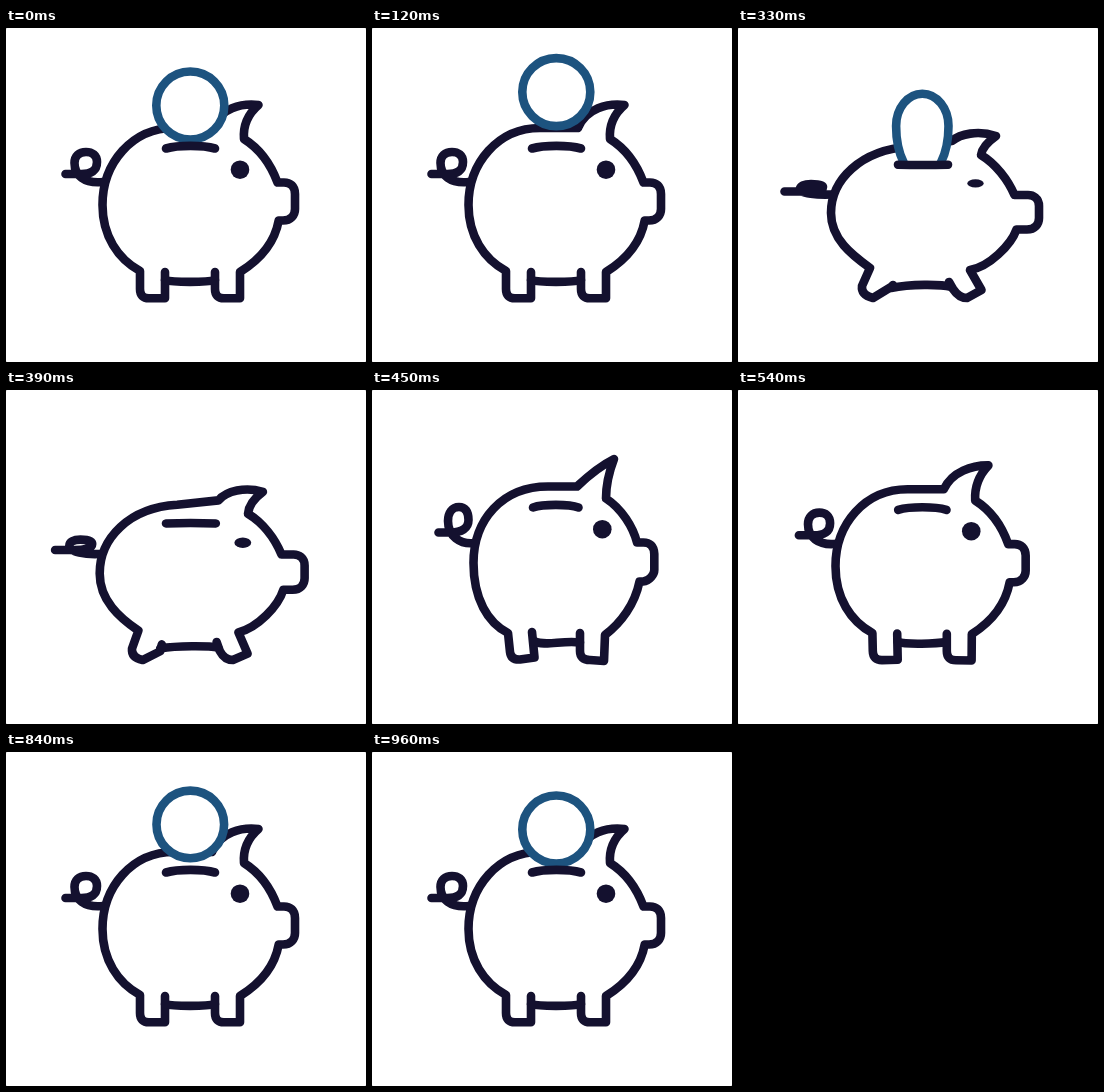
Recreate the animation shown at these times as an HTML page. Size 360x334 px, loop 1.95 s.

```html
<!DOCTYPE html>
<html lang="en">
<head>
<meta charset="utf-8">
<title>Piggy bank</title>
<style>
  html, body { margin: 0; width: 100%; height: 100%; overflow: hidden; background: #aaa; }
  svg { display: block; width: 100vw; height: 100vh; }
  .line { fill: none; stroke: #14112f; stroke-width: 8.6; stroke-linecap: round; stroke-linejoin: round; }
  #coin { fill: #fff; stroke: #1d537f; stroke-width: 8.6; }
  #eye { fill: #14112f; }
</style>
</head>
<body>
<svg viewBox="0 0 360 334">
  <defs><clipPath id="above"><rect id="limit" width="360" height="334"/></clipPath></defs>
  <rect width="360" height="334" rx="1.5" fill="#fff"/>
  <path id="tail" class="line"/>
  <path id="body" class="line"/>
  <path id="belly" class="line"/>
  <ellipse id="eye"/>
  <g clip-path="url(#above)"><path id="coin"/></g>
  <path id="slot" class="line"/>
</svg>
<script>
const LOOP = 1950, STEP = 30, CX = 184.3;
const $ = id => document.getElementById(id);

// Each part has a resting, a squashed and a stretched pose.
const parts = {
  body: [
    `M206 100 L168 100 C126 100 96.5 135 96.5 177 C96.5 208 112 231 134 243
     L134 261 Q134 270.3 143 270.3 L159 270.3 L159 244
     M209 244 L209 261 Q209 270.3 218 270.3 L234 270.3 L234 244
     C255 231 269 213 272.7 192.5 L277 192.5 C285 192.5 289 187 289 181 L289 166
     C289 158 284 154.5 278 154.5 L271.5 154.5 C265 137 254 121 238 111
     C237 98 242 86 252.5 77 C236 75 214 80 206 100`,
    `M214 113 L172 118.5 C122 122 93 152 93 185 C93 211 114 227 132 240
     L124 258 Q123 267 135 270 L153 259 L155 257
     M211 254 L215 261 Q221 270 229 270 L243.5 262 L232 242
     C251 239 273 217 278.5 201.5 L289 201.5 C297 201.5 301 196 301 190 L301 178
     C301 170 295 167 290 167 L276.5 167 C270 152 258 136 243 127
     C244 120 251 113 258 108 C240 102 222 106 214 113`,
    `M205 96.5 L176 96.5 C130 96.5 101.5 130 101.5 173 C101.5 209 116 233 136 243
     L138 262 Q139 270 148 269.5 L162.5 267.5 L160 242
     M208 243 L208 261 Q208 270 218 270 L232 271 L233 245
     C249 233 263 214 267.5 191.5 L271 191.5 C278 191 282.3 184 282.3 180 L282.3 164
     C282 156 278 152 270 152.5 L265 152.5 C261 137 250 119 234 108.5
     C234 98 237 82 242 69 C228 76 214 88 205 96.5`
  ],
  belly: [
    'M159 252 C167 254.5 201 254.5 209 252',
    'M153 260 C172 256 203 256 213 259',
    'M162 251 C172 257 190 250 208 252.5'
  ],
  tail: [
    'M59.5 146 L72 146 C86 147 91 142 91 134 C91 127 86 124 80 124 C73 124 68.5 128 68.5 135 C68.5 147 78 156 97 154',
    'M46.5 163.5 L62 163.5 C78 164 85 162 85 159 C85 157 80 156 73 156 C66 156 62 158 62 161 C62 166 80 167 94 166.5',
    'M66.5 142.5 L77 142.5 C90 143 96.5 138 96.5 130 C96.5 121 93 117 87 117 C80 117 76 123 76 131 C76 146 88 155 103 153'
  ],
  slot: [
    'M160 120.5 C172 117 197 117 209 120.5',
    'M160 136.7 C172 137 197 137 210 136.7',
    'M161 117.5 C171 114 197 114 206.5 117.5'
  ]
};
const eyePoses = [[234, 141.7, 9.3, 9.3], [237.5, 155.4, 8.2, 4.2], [230.3, 139.2, 9.3, 9.3]];

// [time, squash, stretch]
const bounce = [
  [270, 0, 0], [300, .45, 0], [330, 1, 0], [360, 1.35, 0], [390, .8, 0],
  [420, .1, .5], [450, 0, 1], [480, 0, .85], [510, 0, .5], [540, 0, .2], [570, 0, 0]
];
// [time, half width, middle y, upper height, lower height]
const dive = [
  [270, 34, 68.5, 34, 34], [300, 31, 85, 33, 42], [330, 26.2, 98, 32.3, 52],
  [360, 19, 132, 28, 60], [390, 12, 172, 22, 40]
];

const clamp = x => Math.max(0, Math.min(1, x));
const inOutCubic = p => p < .5 ? 4 * p ** 3 : 1 - (2 - 2 * p) ** 3 / 2;
const outQuad = p => 1 - (1 - p) ** 2;
const mix = (r, q, s, a, b) => r + (q - r) * a + (s - r) * b;

function track(keys, t) {
  if (t <= keys[0][0]) return keys[0].slice(1);
  for (let i = 1; i < keys.length; i++) {
    const [a, b] = [keys[i - 1], keys[i]];
    if (t <= b[0]) {
      const p = (t - a[0]) / (b[0] - a[0]);
      return a.slice(1).map((v, j) => v + (b[j + 1] - v) * p);
    }
  }
  return keys[keys.length - 1].slice(1);
}

function blendPath([rest, flat, tall], a, b) {
  const number = /[\d.]+/g;
  const nums = s => s.match(number).map(Number);
  const f = nums(flat), g = nums(tall);
  let i = 0;
  return rest.replace(number, n => {
    const v = mix(+n, f[i], g[i], a, b);
    i++;
    return v.toFixed(2);
  });
}

function coinShape(t) {
  const circle = (y, r) => [r, y, r, r];
  if (t < 60) return circle(77.5, 34);
  if (t < 210) {
    const p = clamp((t - 30) / 165);
    return circle(77.5 - 23.5 * (1 - Math.cos(Math.PI * p)) / 2, 34);
  }
  if (t < 270) return circle(54 + 14.5 * ((t - 210) / 60) ** 2, 34);
  if (t < 390) return track(dive, t);
  if (t < 600) return null;
  return circle(43 + 34.5 * inOutCubic(clamp((t - 600) / 360)),
                34 * outQuad(clamp((t - 590) / 270)));
}

function draw(t) {
  const [a, b] = track(bounce, t);
  for (const id in parts) $(id).setAttribute('d', blendPath(parts[id], a, b));

  ['cx', 'cy', 'rx', 'ry'].forEach((name, i) =>
    $('eye').setAttribute(name, mix(...eyePoses.map(e => e[i]), a, b)));

  const shape = coinShape(t);
  $('coin').style.display = shape ? '' : 'none';
  if (shape) {
    const [w, y, up, down] = shape;
    $('coin').setAttribute('d',
      `M${CX - w} ${y} A${w} ${up} 0 0 1 ${CX + w} ${y} A${w} ${down} 0 0 1 ${CX - w} ${y}Z`);
  }
  const diving = t >= 270 && t < 600;
  $('limit').setAttribute('height', diving ? mix(119, 137, 116, a, b) : 334);
}

const start = performance.now();
function tick() {
  const t = (performance.now() - start) % LOOP;
  draw(Math.floor(t / STEP) * STEP);
  requestAnimationFrame(tick);
}
draw(0);
requestAnimationFrame(tick);
</script>
</body>
</html>
```
